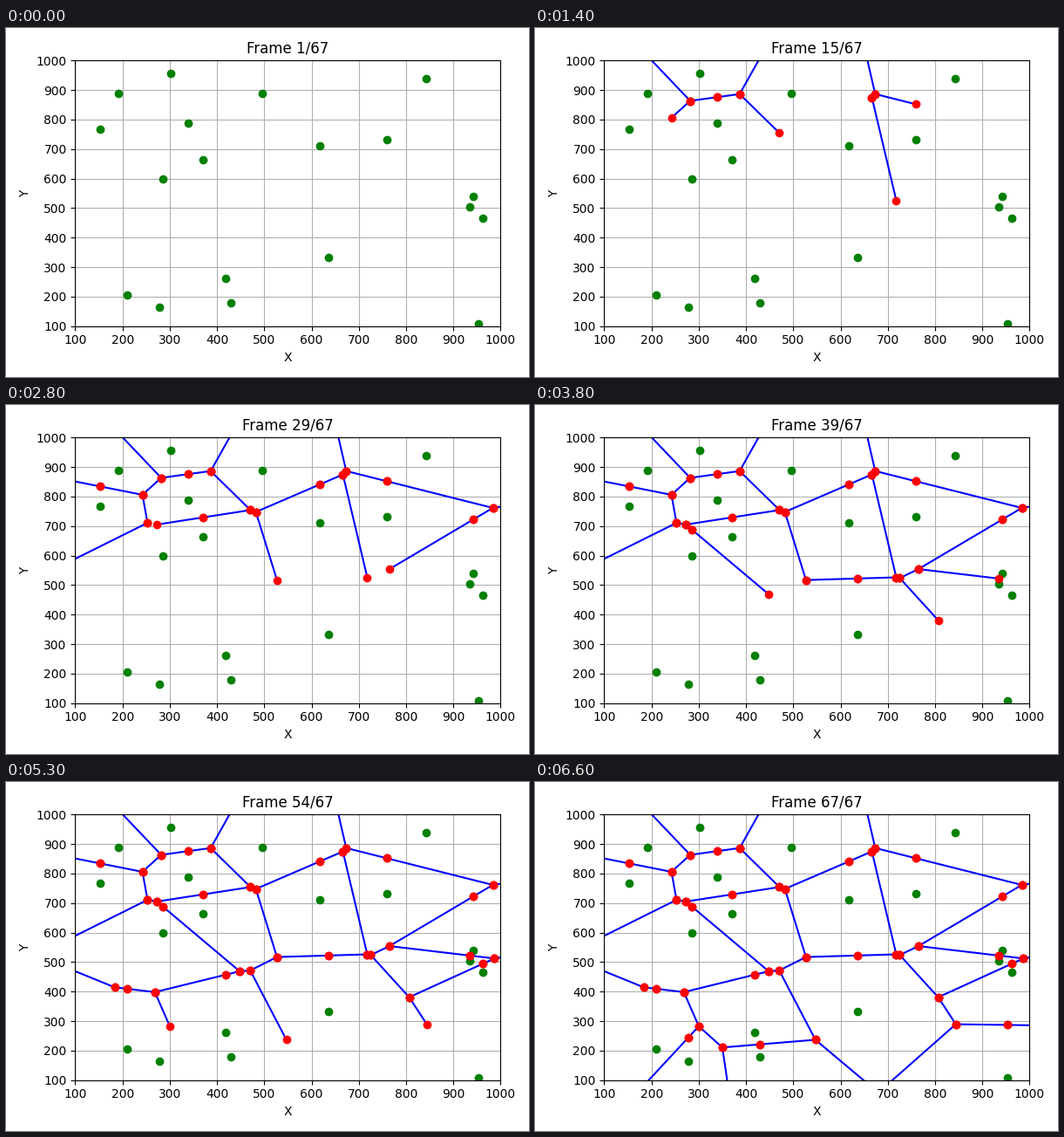
Write a matplotlib script that moves like this. It is 600 by 400 pixels and loops after 6700 ms.

```python
from itertools import combinations

import matplotlib.pyplot as plt
import numpy as np
from matplotlib.animation import FuncAnimation

FRAMES = 67
REACH = 1e4  # length of open-ended borders

# Voronoi sites from top to bottom, the order in which the sweep meets them.
SITES = np.array([
    (302, 956), (843, 938), (191, 890), (496, 888), (339, 788),
    (152, 767), (760, 732), (618, 711), (370, 663), (285, 600),
    (942, 540), (935, 503), (962, 466), (636, 333), (418, 262),
    (55, 247), (209, 205), (429, 179), (278, 165), (954, 108),
], dtype=float)
UNDRAWN = (15, 16)  # the sweep leaves this border unfinished


def border(i, j):
    """Clip the bisector of two sites to the part where both are nearest."""
    a, b = SITES[i], SITES[j]
    mid = (a + b) / 2
    step = np.array([a[1] - b[1], b[0] - a[0]]) / np.hypot(*(b - a))
    lo, hi = -REACH, REACH
    for k, site in enumerate(SITES):
        if k in (i, j):
            continue
        slope = (site - a) @ step
        limit = (site @ site - a @ a) / 2 - (site - a) @ mid
        if slope > 0:
            hi = min(hi, limit / slope)
        else:
            lo = max(lo, limit / slope)
    if lo >= hi:
        return None
    # step points right, so the first end is the left one
    return mid + lo * step, mid + hi * step


def traced(i, j):
    """Segments of a border, each from where the sweep starts to draw it."""
    ends = border(i, j)
    if ends is None or (i, j) == UNDRAWN:
        return []
    left, right = ends
    x = SITES[j][0]
    if x <= left[0]:
        return [(left, right)]
    if x >= right[0]:
        return [(right, left)]
    start = left + (right - left) * (x - left[0]) / (right[0] - left[0])
    return [(start, left), (start, right)]


segments = [s for pair in combinations(range(len(SITES)), 2)
            for s in traced(*pair)]
segments.sort(key=lambda s: -s[0][1])

fig, ax = plt.subplots(figsize=(6, 4), dpi=100)
ax.set(xlim=(100, 1000), ylim=(100, 1000), xlabel="X", ylabel="Y",
       xticks=range(100, 1001, 100), yticks=range(100, 1001, 100))
ax.grid(True)
title = ax.set_title(f"Frame 1/{FRAMES}")
fig.tight_layout()

ax.plot(*SITES.T, "go")
edges = [ax.plot(*zip(*s), "bo-", mfc="r", mec="r")[0] for s in segments]


def update(frame):
    for i, edge in enumerate(edges):
        edge.set_visible(i < frame)
    title.set_text(f"Frame {frame + 1}/{FRAMES}")
    return [*edges, title]


anim = FuncAnimation(fig, update, frames=FRAMES, interval=100,
                     repeat=True, repeat_delay=0, blit=False)
plt.show()
```
